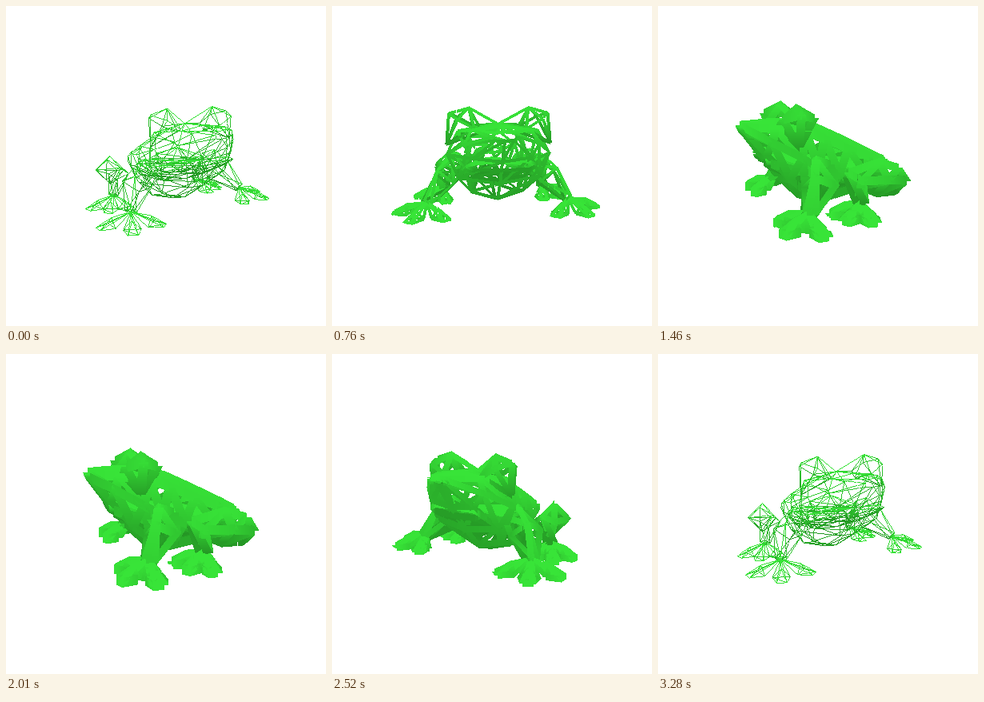
Write an HTML page with a canvas that moves like this. It is 400 px wide and 400 px high and loops after 3.35 s.

```html
<!DOCTYPE html>
<html lang="en">
<head>
<meta charset="utf-8">
<title>Wire frog</title>
<style>
  html, body { margin: 0; width: 100%; height: 100%; overflow: hidden; background: #fff; }
  canvas { display: block; width: 400px; height: 400px; }
</style>
</head>
<body>
<canvas width="400" height="400"></canvas>
<script>
const SIZE = 400, LOOP = 3350, STEPS = 48, CAMERA = 480, GROUND = -42;
const TILT = { sin: 0.21, cos: 0.978 };
const RAD = Math.PI / 180;
const ctx = document.querySelector('canvas').getContext('2d');
const image = ctx.createImageData(SIZE, SIZE);
const pixels = new Uint32Array(image.data.buffer);
const depth = new Float32Array(SIZE * SIZE);

// --- Vectors ---
const add = (a, b, k = 1) => a.map((v, i) => v + b[i] * k);
const sub = (a, b) => add(a, b, -1);
const dot = (a, b) => a.reduce((s, v, i) => s + v * b[i], 0);
const unit = a => a.map(v => v / (Math.hypot(...a) || 1));
const cross = (a, b) => [0, 1, 2].map(i => {
  const j = (i + 1) % 3, k = (i + 2) % 3;
  return a[j] * b[k] - a[k] * b[j];
});
const mean = ps => ps.reduce((s, p) => add(s, p, 1 / ps.length), [0, 0, 0]);
const range = (n, f) => Array.from({ length: n }, (_, i) => f(i));

// --- Mesh: x across, y up, z forward ---
const verts = [], edges = [], known = new Map(), linked = new Set();

function vertex(p) {
  const key = p.map(v => v.toFixed(1)).join();
  if (!known.has(key)) {
    known.set(key, verts.length);
    verts.push({ p, n: [0, 0, 0] });
  }
  return known.get(key);
}

function link(a, b) {
  const key = Math.min(a, b) + '-' + Math.max(a, b);
  if (a === b || linked.has(key)) return;
  linked.add(key);
  edges.push([a, b]);
}

// Adds a triangle whose normal points away from the given centre.
function tri(a, b, c, centre) {
  const n = cross(sub(b, a), sub(c, a));
  const flip = dot(n, sub(mean([a, b, c]), centre)) < 0 ? -1 : 1;
  const ids = [a, b, c].map(vertex);
  ids.forEach((id, k) => {
    verts[id].n = add(verts[id].n, n, flip);
    link(id, ids[(k + 1) % 3]);
  });
}

function fan(hub, rim, centre) {
  rim.forEach((p, i) => tri(hub, p, rim[(i + 1) % rim.length], centre));
}

function loft(rings) {
  rings.slice(1).forEach((s, k) => {
    const r = rings[k], centre = mean([...r, ...s]);
    r.forEach((a, i) => {
      const j = (i + 1) % r.length;
      tri(a, r[j], s[i], centre);
      tri(r[j], s[j], s[i], centre);
    });
  });
}

// Rounded-box cross sections along z; lean pushes the underside forward.
function hull(stations) {
  const soften = v => Math.sign(v) * Math.abs(v) ** 0.7;
  loft(stations.map(({ z, y, w, h, lean }) => range(8, i => {
    const c = soften(Math.cos(i * 45 * RAD)), s = soften(Math.sin(i * 45 * RAD));
    return [w * c, y + h * s, z - lean * s];
  })));
}

// Four-sided tube through joints of the form { p, r }.
function tube(joints) {
  const rings = joints.map(({ p, r }, i) => {
    const from = joints[Math.max(0, i - 1)].p, to = joints[Math.min(joints.length - 1, i + 1)].p;
    const u = unit(cross(sub(to, from), [0, 1, 0.2])), v = unit(cross(sub(to, from), u));
    return range(4, k => add(add(p, u, r * Math.cos(k * 90 * RAD)), v, r * Math.sin(k * 90 * RAD)));
  });
  loft(rings);
  fan(joints[0].p, rings[0], joints[1].p);
  fan(joints.at(-1).p, rings.at(-1), joints.at(-2).p);
}

// Three blunt toes spread around a heading, measured outwards from straight ahead.
function foot(hub, side, heading, gap, length) {
  for (const i of [-1, 0, 1]) {
    const a = (heading + gap * i) * RAD;
    const at = (f, w, y) => [
      hub[0] + side * (f * length * Math.sin(a) + w * Math.cos(a)),
      y,
      hub[2] + f * length * Math.cos(a) - w * Math.sin(a)
    ];
    const rim = [hub, at(0.6, 9, GROUND), at(1, 5, GROUND), at(1, -5, GROUND), at(0.6, -9, GROUND)];
    const core = at(0.6, 0, GROUND + 3);
    fan(at(0.6, 0, GROUND + 9), rim, core);
    tri(hub, rim[2], rim[3], core);
    tri(rim[1], rim[3], rim[4], core);
  }
}

// trunk, snout to rump
hull([
  { z: 95, y: 50, w: 12, h: 5, lean: -2 },
  { z: 70, y: 39, w: 40, h: 18, lean: 6 },
  { z: 43, y: 24, w: 58, h: 32, lean: 12 },
  { z: 18, y: 8, w: 40, h: 40, lean: 14 },
  { z: -10, y: -3, w: 36, h: 36, lean: 18 },
  { z: -50, y: -7, w: 24, h: 24, lean: 10 },
  { z: -85, y: -5, w: 9, h: 8, lean: 3 }
]);

// mouth and gut
hull([
  { z: 72, y: 16, w: 38, h: 5, lean: 0 },
  { z: 25, y: 0, w: 40, h: 9, lean: 8 },
  { z: -40, y: -8, w: 22, h: 10, lean: 4 }
]);

for (const side of [1, -1]) {
  const m = ([x, y, z]) => [x * side, y, z];
  const joint = (x, y, z, r) => ({ p: m([x, y, z]), r });

  // eye: a tilted rim between its crown and the cheek
  const core = m([38, 55, 42]), crown = m([33, 75, 41]), brow = [0, 56, 31];
  const rim = range(6, i => {
    const c = Math.cos(i * 60 * RAD), s = Math.sin(i * 60 * RAD);
    return m([37 + 18 * c, 59 + 10 * c, 42 + 20 * s]);
  });
  fan(crown, rim, core);
  fan(m([58, 36, 46]), rim, core);
  tri(crown, brow, rim[2], core);
  tri(crown, brow, rim[4], core);

  // front limb
  const wrist = joint(82, -31, 43, 6);
  tube([joint(44, 10, 20, 14), joint(62, -8, 24, 17), wrist]);
  foot(wrist.p, side, 28, 64, 38);

  // folded hind limb
  const ankle = joint(66, -31, -24, 6);
  tube([joint(43, -14, -84, 14), joint(56, -6, -50, 18), joint(62, -4, -17, 12), ankle]);
  foot(ankle.p, side, 38, 46, 36);
}

for (const v of verts) v.n = unit(v.n);

// --- Drawing ---
function project({ p: [x, y, z], n }, sin, cos) {
  const near = z * cos - x * sin;
  const scale = CAMERA / (CAMERA - near * TILT.cos - y * TILT.sin);
  const light = 0.9 * n[1] + 0.3 * (n[2] * cos - n[0] * sin);
  return {
    x: 203 + (x * cos + z * sin) * scale,
    y: 200 - (y * TILT.cos - near * TILT.sin) * scale,
    scale,
    shade: 150 + 78 * Math.max(0, Math.min(1, 0.5 + 0.55 * light))
  };
}

// Hard-edged line, thickened only along its minor axis and depth tested.
function line(a, b, width) {
  const dx = b.x - a.x, dy = b.y - a.y;
  const flat = Math.abs(dx) > Math.abs(dy);
  const count = Math.max(1, Math.round(Math.max(Math.abs(dx), Math.abs(dy))));
  const shift = (width - 1) / 2;
  for (let i = 0; i <= count; i++) {
    const t = i / count;
    const x = Math.round(a.x + dx * t - (flat ? 0 : shift));
    const y = Math.round(a.y + dy * t - (flat ? shift : 0));
    const scale = a.scale + (b.scale - a.scale) * t;
    const g = Math.round(a.shade + (b.shade - a.shade) * t), rb = Math.round(g * 0.245);
    const colour = (255 << 24 | rb << 16 | g << 8 | rb) >>> 0;
    let at = y * SIZE + x;
    for (let k = 0; k < width; k++, at += flat ? SIZE : 1) {
      if (scale > depth[at]) {
        depth[at] = scale;
        pixels[at] = colour;
      }
    }
  }
}

// The turn and the line width share one eased swing.
function draw(phase) {
  const base = (phase * 360 - 15) * RAD;
  const swing = Math.cos(base - 0.105 * Math.sin(2 * base));
  const yaw = (-20 + 58 * swing) * RAD;
  const width = Math.round(1 + 5.5 * (1 - swing));
  const points = verts.map(v => project(v, Math.sin(yaw), Math.cos(yaw)));
  pixels.fill(0xffffffff);
  depth.fill(0);
  for (const [a, b] of edges) line(points[a], points[b], width);
  ctx.putImageData(image, 0, 0);
}

let shown = -1;
const start = performance.now();
function tick() {
  const time = (performance.now() - start) % LOOP;
  const step = Math.min(STEPS - 1, Math.floor((time + 15) * STEPS / LOOP));
  if (step !== shown) draw((shown = step) / STEPS);
  requestAnimationFrame(tick);
}
tick();
</script>
</body>
</html>
```
